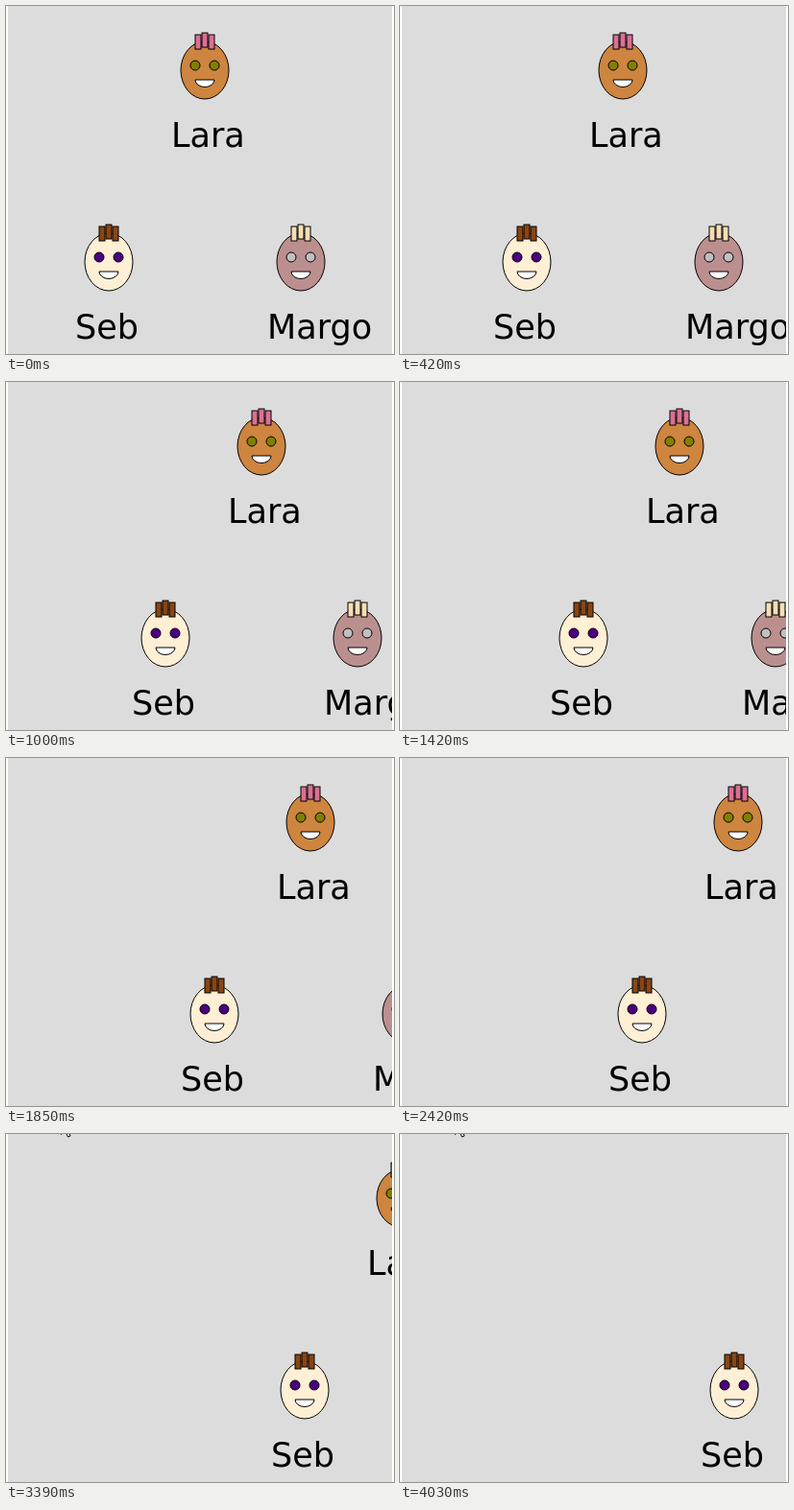
Write an HTML page that moves like this. It is 404 px wide and 363 px high and loops after 4.06 s.

```html
<!DOCTYPE html>
<html lang="en">
<head>
<meta charset="utf-8">
<title>Drifting faces</title>
<style>
  html, body { margin: 0; width: 100%; height: 100%; overflow: hidden; background: #fff; }
  svg { display: block; }
  text { font: 35px "DejaVu Sans", sans-serif; }
</style>
</head>
<body>
<svg width="404" height="363" viewBox="0 0 404 363">
  <clipPath id="room"><rect x="2" width="400" height="363"/></clipPath>
  <g clip-path="url(#room)">
    <rect x="2" width="400" height="363" fill="#dcdcdc"/>
    <g id="crowd"></g>
    <path id="pointer" d="M0 0V17L4 13L7 19.5L9.5 18.5L7 12H12Z" fill="#fff" stroke="#000"/>
  </g>
</svg>
<script>
const LOOP = 4060;
const crowd = document.getElementById('crowd');
const pointer = document.getElementById('pointer');

const people = [
  { name: 'Lara', x: 207, y: 67, skin: '#cd853f', eyes: '#808000', hair: '#db7093' },
  { name: 'Seb', x: 107, y: 267, skin: '#ffefd5', eyes: '#4b0082', hair: '#8b4513' },
  { name: 'Margo', x: 307, y: 267, skin: '#bc8f8f', eyes: '#c0c0c0', hair: '#f5deb3' }
];

// Steady drift with one stall, then a jump to catch up.
const stall = { from: 730, to: 910, x: 43 };
const legs = [
  { t0: 0, t1: stall.from, x0: 0, x1: stall.x },
  { t0: stall.to, t1: 3390, x0: 53, x1: 204 },
  { t0: 3390, t1: 4030, x0: 204, x1: 241 }
];

function face({ name, x, y, skin, eyes, hair }) {
  const eye = dx => `<circle cx="${dx}" cy="-5" r="5" fill="${eyes}"/>`;
  const lock = (dx, dy) => `<rect x="${dx}" y="${dy}" width="6" height="15" fill="${hair}"/>`;
  return `<g transform="translate(${x} ${y})">
    <g stroke="#000">
      <ellipse rx="25" ry="30" fill="${skin}"/>
      ${eye(-10)}${eye(10)}
      <path d="M-10 10A10 7.5 0 0 0 10 10Z" fill="#fff"/>
      ${lock(-10, -37)}${lock(-3, -39)}${lock(4, -37)}
    </g>
    <text x="-35" y="80">${name}</text>
  </g>`;
}

function travel(t) {
  const { t0, t1, x0, x1 } = legs.filter(leg => leg.t0 <= t).pop();
  const part = Math.min(1, (t - t0) / (t1 - t0));
  return Math.round(x0 + (x1 - x0) * part);
}

function draw(now) {
  const t = now % LOOP;
  crowd.setAttribute('transform', `translate(${travel(t)} 0)`);
  pointer.style.display = t < 2900 ? 'none' : '';
  pointer.setAttribute('transform', `translate(57.5 ${t < 3090 ? -18.5 : -16.5})`);
}

function loop(now) {
  draw(now);
  requestAnimationFrame(loop);
}

crowd.innerHTML = people.map(face).join('');
draw(0);
requestAnimationFrame(loop);
</script>
</body>
</html>
```
